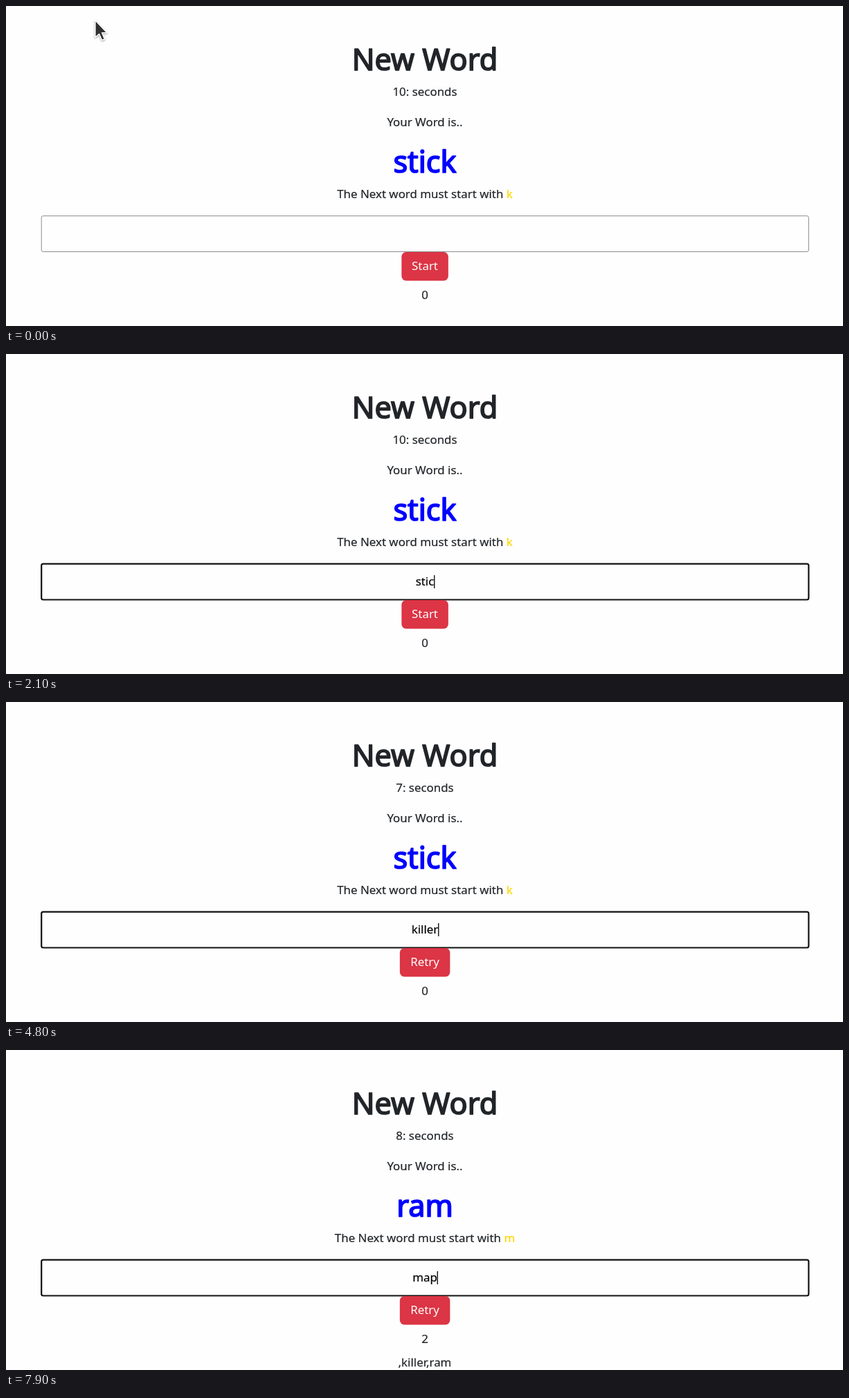
Animation, 1209 px wide and 463 px high, one loop 8 s. Source, as an HTML page:

```html
<!DOCTYPE html>
<html lang="en">
<head>
<meta charset="utf-8">
<title>New Word</title>
<style>
  html, body { margin: 0; width: 100%; height: 100%; overflow: hidden; background: #fefefe; }
  svg { display: block; width: 100%; height: 100%; }
  text { font: 16.9px "Noto Sans", "Open Sans", sans-serif; fill: #212529; stroke: #212529; stroke-width: .2px; text-anchor: middle; }
  .big { font-size: 43.2px; stroke-width: 1.7px; stroke-linejoin: round; }
  #word { fill: #00f; stroke: #00f; }
  #letter { fill: #ffd700; stroke: #ffd700; }
  #typed { fill: #000; stroke: #000; }
  #label { fill: #fff; stroke: none; }
  #field { fill: #fefefe; stroke: #8c8c8c; stroke-width: 1; }
  #field.hover { stroke: #686868; }
  #field.focus { stroke: #111; stroke-width: 2.2; }
  #button { fill: #dc3545; }
  #arrow, #beam { filter: drop-shadow(0 1px 1px #0006); }
</style>
</head>
<body>
<svg viewBox="0 0 1209 463">
  <defs>
    <path id="stem" d="M-4 -13H-2Q0 -13 0 -11V11Q0 13 -2 13H-4M4 -13H2Q0 -13 0 -11M0 11Q0 13 2 13H4"/>
  </defs>
  <text class="big" x="605" y="92.5">New Word</text>
  <text x="605" y="130"><tspan id="seconds">10</tspan>: seconds</text>
  <text x="605" y="174">Your Word is..</text>
  <text class="big" id="word" x="605" y="240.7"></text>
  <text x="605" y="278">The Next word must start with <tspan id="letter"></tspan></text>
  <rect id="field" x="51.2" y="303.7" width="1108.2" height="51.8" rx="2.5"/>
  <text id="typed" x="605" y="335"></text>
  <rect id="caret" y="320" width="1.3" height="19"/>
  <rect id="button" y="356" height="41.5" rx="6.5"/>
  <text id="label" x="605" y="382"></text>
  <text id="score" x="605" y="424"></text>
  <text id="list" x="605" y="458"></text>
  <path id="arrow" d="M.8 .5V25.5L6.5 20.5L10.5 29.5L14.5 27.7L10.6 18.8H18Z"
        fill="#303030" stroke="#fff" stroke-width="1.6" stroke-linejoin="round"/>
  <g id="beam" fill="none" stroke-linecap="square">
    <use href="#stem" stroke="#fff" stroke-width="4"/>
    <use href="#stem" stroke="#222" stroke-width="1.7"/>
  </g>
</svg>
<script>
const LOOP = 8000;
const el = Object.fromEntries([...document.querySelectorAll('[id]')].map(node => [node.id, node]));

const arrow = (x, y) => ({ pointer: 'arrow', x, y });
const beam = (x, y) => ({ pointer: 'beam', x, y });
const type = typed => ({ typed, caret: true });
const tick = seconds => ({ seconds });
const submit = (word, score, list) =>
  ({ word, score, list, seconds: 10, typed: '', caret: true });

const start = {
  ...arrow(128, 20), seconds: 10, word: 'stick', typed: '', caret: false,
  label: 'Start', score: 0, list: '', field: ''
};

// Each entry changes the state from its time on.
const events = [
  [100, arrow(150, 52)],
  [200, arrow(218, 135)],
  [300, arrow(320, 250)],
  [400, arrow(425, 361)],
  [500, arrow(488, 393)],
  [600, arrow(515, 370)],
  [700, { ...beam(522, 324), field: 'hover' }],
  [800, { field: 'focus', caret: true }],
  [900, beam(524, 361)],
  [1000, { pointer: '' }],
  [1300, { caret: false }],
  [1500, type('s')],
  [1700, type('st')],
  [1900, type('sti')],
  [2100, type('stic')],
  [2200, type('stick')],
  [2500, tick(9)],
  [2700, { caret: false }],
  [2900, { typed: 'stic' }],
  [3100, { typed: 'sti' }],
  [3200, { caret: true }],
  [3300, type('st')],
  [3400, type('s')],
  [3500, tick(8)],
  [3600, type('')],
  [3800, { ...type('k'), label: 'Retry' }],
  [4200, type('ki')],
  [4400, type('kil')],
  [4500, tick(7)],
  [4600, type('kill')],
  [4700, type('kille')],
  [4800, type('killer')],
  [5400, submit('killer', 1, ',killer')],
  [5500, tick(9)],
  [5600, { caret: false }],
  [5700, type('r')],
  [5800, type('ra')],
  [5900, type('ram')],
  [6400, submit('ram', 2, ',killer,ram')],
  [6500, tick(9)],
  [6600, { caret: false }],
  [7100, { caret: true }],
  [7200, type('m')],
  [7500, tick(8)],
  [7700, { caret: false }],
  [7800, type('ma')],
  [7900, type('map')]
];

const show = (node, on) => node.setAttribute('visibility', on ? 'visible' : 'hidden');

function render(state) {
  for (const key of ['seconds', 'word', 'typed', 'label', 'score', 'list'])
    el[key].textContent = state[key];
  el.letter.textContent = state.word.at(-1);
  el.field.setAttribute('class', state.field);

  const half = state.typed ? el.typed.getComputedTextLength() / 2 : 0;
  el.caret.setAttribute('x', 604.8 + half);
  show(el.caret, state.caret);

  const width = state.label === 'Start' ? 67.5 : 72.5;
  el.button.setAttribute('x', 605.1 - width / 2);
  el.button.setAttribute('width', width);

  for (const name of ['arrow', 'beam']) {
    show(el[name], state.pointer === name);
    el[name].setAttribute('transform', `translate(${state.x} ${state.y})`);
  }
}

const origin = performance.now();
let shown = -1;

function frame() {
  const time = Math.max(0, performance.now() - origin) % LOOP;
  const past = events.filter(([at]) => at <= time);
  if (past.length !== shown) {
    shown = past.length;
    render(Object.assign({}, start, ...past.map(([, change]) => change)));
  }
  requestAnimationFrame(frame);
}
frame();
</script>
</body>
</html>
```
